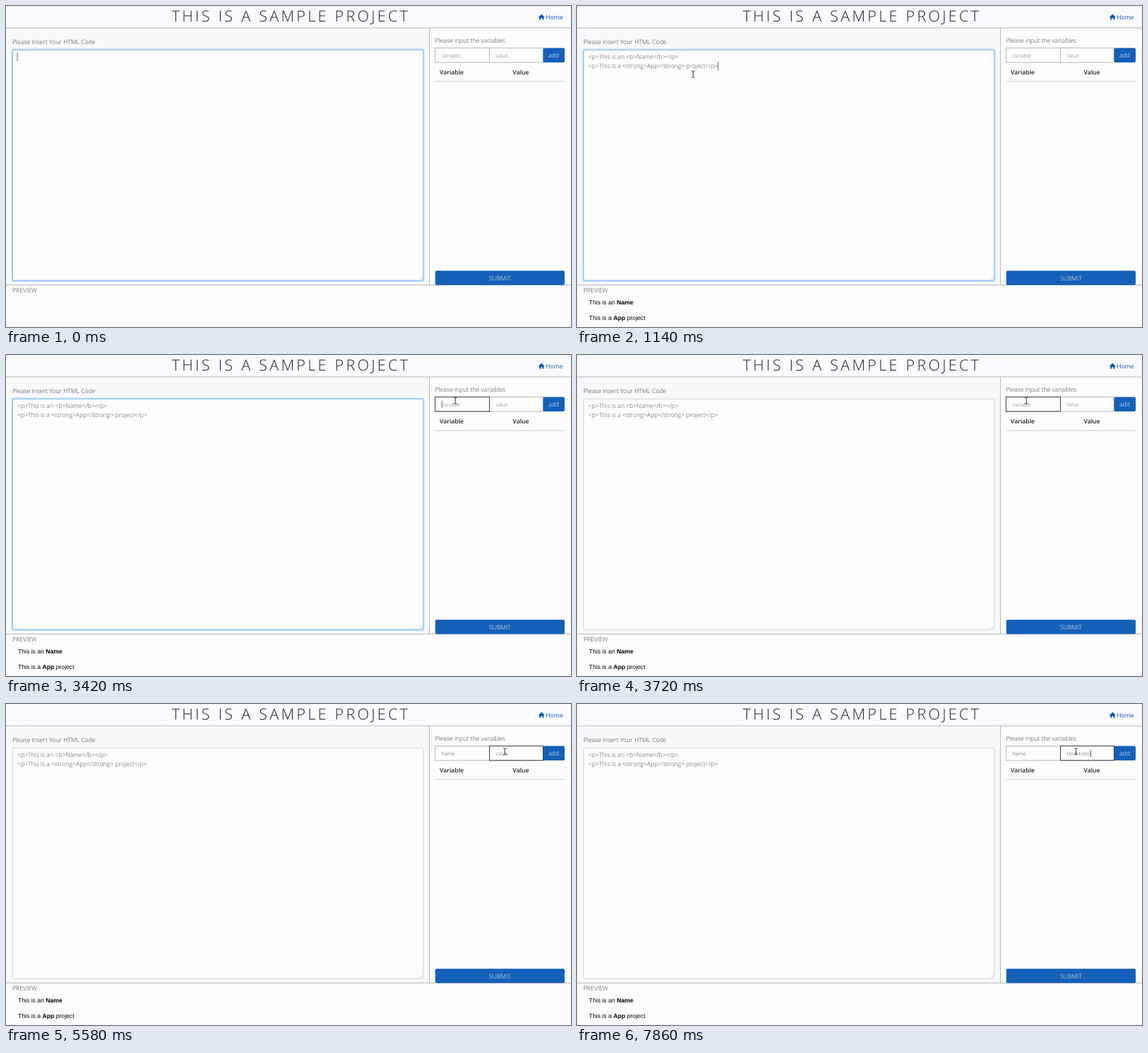
Animation, 800 px wide and 455 px high, one loop 8 s. Source, as an HTML page:

```html
<!DOCTYPE html>
<html lang="en">
<head>
<meta charset="utf-8">
<title>Sample project</title>
<style>
  html, body { margin: 0; width: 100%; height: 100%; overflow: hidden; background: #fdfdfd; }
  svg { display: block; width: 100%; height: 100%; }
  text { font: 300 8.7px "Open Sans", sans-serif; fill: #33373b; white-space: pre; text-rendering: geometricPrecision; }
  .title { font-size: 21.6px; letter-spacing: .15em; fill: #212529; }
  .home { font-weight: 400; font-size: 8.6px; fill: #0d57b5; }
  .head { font-weight: 600; font-size: 8.65px; fill: #212529; }
  .light { fill: #fff; }
  .code { fill: #495057; }
  .field { font-size: 7.2px; fill: #495057; }
  .empty { fill: #6c757d; }
  .out text { font: 400 8.65px "Liberation Sans", Arial, sans-serif; fill: #000; }
  .out .b { font-weight: 700; }
  .line { fill: none; stroke: #b4b7ba; }
  .box { fill: #fdfdfd; stroke: #b4b8bc; }
  .btn { fill: #1560b8; }
  .caret { fill: #444; }
</style>
</head>
<body>
<svg viewBox="0 0 800 455" preserveAspectRatio="none">
  <rect width="800" height="455" fill="#fdfdfd"/>
  <rect width="800" height="31" fill="#fafaff"/>
  <rect y="31" width="599" height="364" fill="#f8f9fa"/>
  <path class="line" d="M0 31H800M599.5 31V395.5M0 395.5H800"/>

  <text class="title" x="234.8" y="22">THIS IS A SAMPLE PROJECT</text>
  <path fill="#0d57b5" d="M758.3 11.6L762.6 15.8L762 16.5L761.4 16V19.6H759.3V17H757.3V19.6H755.2V16L754.6 16.5L754 15.8Z"/>
  <text class="home" x="764.2" y="19">Home</text>

  <text x="9" y="54.2">Please Insert Your HTML Code</text>
  <rect x="9.3" y="62.3" width="581.6" height="326.8" rx="2" fill="#fdfdfd" stroke="#ced4da"/>
  <g id="ring" fill="none">
    <rect x="8.6" y="61.6" width="583" height="328.2" rx="2.6" stroke="#bfdeff" stroke-width="2.2"/>
    <rect x="9.3" y="62.3" width="581.6" height="326.8" rx="2" stroke="#8ec0f5"/>
  </g>
  <path d="M585.5 388L590 383.5M588 388L590 386" stroke="#bbb" stroke-width=".6"/>
  <g id="code">
    <text class="code" x="16" y="75">&lt;p&gt;This is an &lt;b&gt;Name&lt;/b&gt;&lt;/p&gt;</text>
    <text class="code" id="last" x="16" y="88">&lt;p&gt;This is a &lt;strong&gt;App&lt;/strong&gt; project&lt;/p&gt;</text>
  </g>

  <text x="607.5" y="52">Please input the variables</text>
  <rect class="box" x="607.5" y="59.5" width="77" height="20.5"/>
  <rect class="box" x="684.5" y="59.5" width="76" height="20.5"/>
  <rect class="btn" id="add" x="760.5" y="59.5" width="30.5" height="20.5" rx="2"/>
  <text class="light" x="768" y="73">add</text>
  <rect id="focus" y="59.5" height="20.5" fill="none" stroke="#222" stroke-width=".8"/>
  <text class="field" id="name" x="616.7" y="72.6"></text>
  <text class="field" id="value" x="693.2" y="72.6"></text>
  <text class="head" x="614" y="97">Variable</text>
  <text class="head" x="717.5" y="97">Value</text>
  <path d="M608 107H791" stroke="#c8cbce"/>
  <rect class="btn" x="607.8" y="375.2" width="183.2" height="20.4" rx="2"/>
  <text class="light" x="699.3" y="388.7" text-anchor="middle">SUBMIT</text>

  <text x="9" y="406.2">PREVIEW</text>
  <g id="out" class="out">
    <text x="17" y="423">This is an <tspan class="b">Name</tspan></text>
    <text x="17" y="444.7">This is a <tspan class="b">App</tspan> project</text>
  </g>

  <rect class="caret" id="caret" width=".8"/>
  <path id="arrow" d="M0 0V8.6L2 6.8L3.3 9.8L4.7 9.2L3.4 6.3H6Z" fill="#fff" stroke="#555" stroke-width=".7"/>
  <path id="beam" d="M-2.4-4.4Q-.4-4.4 0-3.7Q.4-4.4 2.4-4.4M0-3.8V4.2M-2.4 4.7Q-.4 4.7 0 4Q.4 4.7 2.4 4.7" fill="none" stroke="#222" stroke-width=".9"/>
  <path id="hand" d="M-1 0Q0-1 1 0V3.4L4 4.2Q5 4.6 4.6 6.4L3.8 9H-1.4L-4 5.4Q-3.2 4.2-1 6Z" fill="#fff" stroke="#222" stroke-width=".7"/>
</svg>
<script>
const LOOP = 8000, TICK = 60;
const ENTER = 120, PASTE = 1140, PICK_NAME = 3420, PICK_VALUE = 5280;
const $ = id => document.getElementById(id);
const show = (id, on) => { $(id).style.display = on ? "" : "none"; };
const clamp = k => Math.max(0, Math.min(1, k));
const ease = k => k * k * (3 - 2 * k);

// Each move glides from the previous spot to `to`
const home = [770, 446];
const moves = [
  { from: ENTER, until: 540, to: [164.5, 96.5] },
  { from: 1620, until: 2100, to: [111, 440] },
  { from: 2220, until: 2400, to: [130, 393.5] },
  { from: 2400, until: 2520, to: [116, 443] },
  { from: 2640, until: 2820, to: [306, 85] },
  { from: 3000, until: PICK_NAME, to: [636.3, 64.7] },
  { from: 4980, until: 5160, to: [772, 70] },
  { from: 5160, until: PICK_VALUE, to: [706.5, 67] }
];

// A burst types one letter every `gap` ms
const burst = (text, start, gap) => [...text].map((char, i) => ({ char, at: start + i * gap }));
const keys = {
  name: burst("Name", 4020, 160),
  value: [...burst("H", 5820, 0), ...burst("tml Edito", 6300, 195)]
};
const hint = { name: "Variable", value: "Value" };
const resets = [0, PASTE, PICK_NAME, PICK_VALUE, ...[...keys.name, ...keys.value].map(k => k.at)];

function pointer(t) {
  return moves.reduce(([x, y], { from, until, to }) => {
    const k = ease(clamp((t - from) / (until - from)));
    return [x + (to[0] - x) * k, y + (to[1] - y) * k];
  }, home);
}

function shapeAt([x, y]) {
  const within = (l, t, r, b) => x >= l && x <= r && y >= t && y <= b;
  if (within(760, 59, 791, 81) || within(607, 375, 791, 396)) return "hand";
  if (within(9, 62, 591, 394) || within(607, 59, 760, 81)) return "beam";
  return "arrow";
}

function place(id, [x, y], opacity) {
  show(id, true);
  $(id).style.opacity = opacity;
  $(id).setAttribute("transform", `translate(${x} ${y})`);
}

function fill(id, t) {
  const text = keys[id].filter(k => k.at <= t).map(k => k.char).join("");
  $(id).textContent = text || hint[id];
  $(id).classList.toggle("empty", !text);
  return text ? $(id).getComputedTextLength() : 0;
}

// The caret blinks each half second, restarting at every input
function caretLit(t) {
  const age = t - Math.max(...resets.filter(r => r <= t));
  return (age + 200) % 1000 < 500;
}

function setCaret(x, y, h) {
  const c = $("caret");
  c.setAttribute("x", x);
  c.setAttribute("y", y);
  c.setAttribute("height", h);
}

function drawPointer(t) {
  ["arrow", "beam", "hand"].forEach(id => show(id, false));
  $("add").style.fill = "";
  if (t < ENTER) return;
  const spot = pointer(t), shape = shapeAt(spot);
  const past = pointer(t - TICK), pastShape = shapeAt(past);
  // A changing pointer leaves its former shape for one tick
  if (pastShape !== shape) place(pastShape, past, 0.7);
  place(shape, spot, 1);
  if (shape === "hand") $("add").style.fill = "#114f99";
}

function draw(now) {
  const t = Math.floor((now % LOOP) / TICK) * TICK;
  const pasted = t >= PASTE, onName = t >= PICK_NAME, onValue = t >= PICK_VALUE;
  show("code", pasted);
  show("out", pasted);
  $("ring").style.opacity = clamp((PICK_NAME + 120 - t) / 120);

  const nameW = fill("name", t), valueW = fill("value", t);
  show("focus", onName);
  $("focus").setAttribute("x", onValue ? 684.5 : 607.5);
  $("focus").setAttribute("width", onValue ? 76 : 77);

  show("caret", caretLit(t));
  if (onValue) setCaret(693.2 + valueW, 65, 10);
  else if (onName) setCaret(616.7 + nameW, 65, 10);
  else if (pasted) setCaret(15.6 + $("last").getComputedTextLength(), 79, 12);
  else setCaret(15.6, 66, 12);

  drawPointer(t);
}

function frame() {
  draw(performance.now());
  requestAnimationFrame(frame);
}
frame();
</script>
</body>
</html>
```
